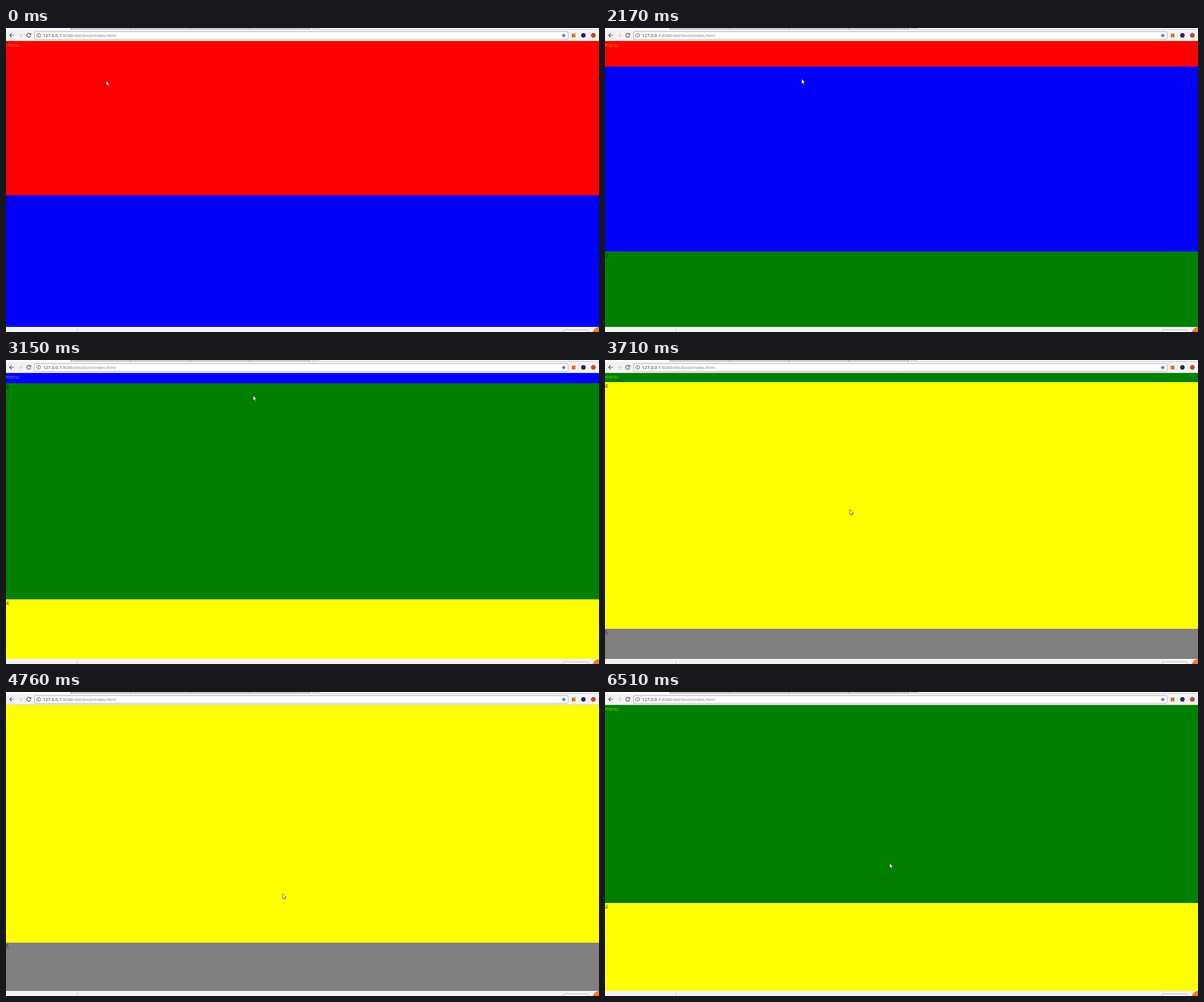
These frames come from a looping animation (1045x536 px, 6720 ms). An HTML page with a canvas:

```html
<!DOCTYPE html>
<html lang="en">
<head>
<meta charset="utf-8">
<title>Scrolling sections</title>
<style>
  html, body { margin: 0; width: 100%; height: 100%; overflow: hidden; background: #f2f2f2; }
  canvas { display: block; }
</style>
</head>
<body>
<canvas id="stage" width="1045" height="536"></canvas>
<script>
const ctx = document.getElementById('stage').getContext('2d');
const LOOP = 6720, STEP = 70;
const WIDTH = 1045, TOP = 23, BOTTOM = 527, SCALE = 0.544;
const FONT = '"Open Sans", "Noto Sans", sans-serif';
const COLORS = ['#f00', '#00f', '#008000', '#ff0', '#808080'];

// Rows of [time, value, ...]
const SCROLL = [
  [1190, 0], [1260, 20], [1400, 162], [1470, 162], [2170, 227], [2240, 320], [2380, 320],
  [2800, 335], [2870, 380], [3010, 518], [3080, 560], [3150, 580], [3290, 650], [3500, 755],
  [3570, 800], [3710, 963], [3780, 1078], [3920, 1078], [3990, 1200], [4060, 1284],
  [4200, 1284], [4760, 995]
];
const POINTER = [
  [70, 176, 92], [420, 215, 132], [770, 260, 187], [1190, 308, 253], [1260, 308, 292],
  [1400, 339, 130], [1470, 339, 130], [2170, 346, 89], [2240, 349, 68], [2380, 349, 68],
  [2800, 405, 322], [3010, 429, 124], [3080, 433, 82], [3150, 435, 62], [3500, 424, 425],
  [3570, 426, 390], [3710, 431, 263], [3780, 437, 190], [3920, 437, 190], [4060, 460, 66],
  [4200, 460, 66], [4760, 487, 355], [4970, 497, 418], [5670, 497, 418], [6300, 501, 304],
  [6370, 501, 301]
];

function sample(keys, t, column = 1) {
  const i = keys.findIndex(key => key[0] > t);
  if (i === 0) return keys[0][column];
  if (i < 0) return keys[keys.length - 1][column];
  const a = keys[i - 1], b = keys[i];
  return a[column] + (b[column] - a[column]) * (t - a[0]) / (b[0] - a[0]);
}

function scrollAt(t) {
  if (t < 4760) return sample(SCROLL, t);
  const rest = Math.max(0, 1 - (t - 4760) / 1540);
  return 630 + 365 * rest ** 2.6;
}

function rect(x, y, w, h, color) {
  ctx.fillStyle = color;
  ctx.fillRect(x, y, w, h);
}

function disc(x, y, r, color) {
  ctx.fillStyle = color;
  ctx.beginPath();
  ctx.arc(x, y, r, 0, 7);
  ctx.fill();
}

function box(x, y, w, h) {
  ctx.beginPath();
  ctx.roundRect(x, y, w, h, 1.5);
  ctx.fillStyle = '#fff';
  ctx.fill();
  ctx.strokeStyle = '#b4b4b4';
  ctx.lineWidth = 1;
  ctx.stroke();
}

function text(value, x, y, size, color) {
  ctx.font = `${size}px ${FONT}`;
  ctx.fillStyle = color;
  ctx.fillText(value, x, y);
  return ctx.measureText(value).width;
}

function line(path, color, width = 1.1) {
  ctx.strokeStyle = color;
  ctx.lineWidth = width;
  ctx.stroke(new Path2D(path));
}

function drawSections(scroll) {
  ctx.save();
  ctx.beginPath();
  ctx.rect(0, TOP, WIDTH, BOTTOM - TOP);
  ctx.clip();
  let offset = 0;
  COLORS.forEach((color, i) => {
    const height = (500 + 100 * i) * SCALE;
    const y = Math.round(TOP + offset - scroll);
    rect(0, y, WIDTH, Math.ceil(height) + 1, color);
    text(i + 1, 0, y + 9.6, 8.7, 'rgba(0,0,0,.75)');
    offset += height;
  });
  text('menu', 0, TOP + 9.6, 8.7, 'rgba(255,255,0,.55)');
  ctx.restore();
}

function drawToolbar() {
  rect(0, 0, WIDTH, TOP, '#f2f2f2');
  rect(0, 0, WIDTH, 3, '#fdfdfd');
  rect(114, 0, 421, 2.5, '#cfcfcf');
  rect(114, 2, WIDTH, 0.8, '#bcbcbc');
  for (let x = 114; x < 540; x += 105) rect(x, 0, 1, 3, '#999');
  rect(538, 0, 14, 1, '#bbb');
  rect(0, 22, WIDTH, 1, '#d0d0d0');

  line('M14 13H6.5M10 9.4L6.4 13L10 16.6', '#505050', 1.2);
  line('M21 13H28.5M25 9.4L28.6 13L25 16.6', '#cfcfcf', 1.2);
  line('M43 10.7A3.5 3.5 0 1 0 43.4 14.3M43.7 9.2V12H40.9', '#505050', 1.2);

  box(50.5, 6.5, 940, 13.5);
  line('M61 13A3.4 3.4 0 1 1 54.2 13A3.4 3.4 0 1 1 61 13M57.6 12.4V15M57.6 10.7V11.6', '#555', 0.9);
  const hostWidth = text('127.0.0.1', 65, 15.9, 7.83, '#222');
  text(':8088/dst/boot/index.html', 65 + hostWidth, 15.9, 7.83, '#777');

  ctx.fillStyle = '#4d78cc';
  ctx.beginPath();
  for (let i = 0; i < 10; i++) {
    const angle = i * Math.PI / 5, r = i % 2 ? 1.9 : 4.5;
    ctx.lineTo(983 + r * Math.sin(angle), 13.3 - r * Math.cos(angle));
  }
  ctx.fill();

  rect(997, 10, 6.5, 6.5, '#e07018');
  disc(1017.5, 13, 4, '#252b4d');
  disc(1035, 13, 4.3, '#c84b22');
}

function drawShelf() {
  rect(0, BOTTOM, WIDTH, 9, '#f2f2f2');
  rect(125, 530, 1, 6, '#c8c8c8');
  box(982.5, 532.5, 43, 8);
  disc(1046, 539, 12, '#f47b13');
}

function drawPointer(x, y) {
  ctx.save();
  ctx.translate(x + 0.4, y + 0.6);
  const arrow = new Path2D('M0 0V9L2.1 7.1L3.6 10.4L5 9.8L3.6 6.6H6.4Z');
  ctx.fillStyle = '#fff';
  ctx.fill(arrow);
  ctx.strokeStyle = 'rgba(0,0,0,.8)';
  ctx.lineWidth = 0.7;
  ctx.stroke(arrow);
  ctx.restore();
}

function draw(now) {
  const t = Math.floor(now % LOOP / STEP) * STEP;
  drawSections(scrollAt(t));
  drawToolbar();
  drawShelf();
  drawPointer(Math.round(sample(POINTER, t, 1)), Math.round(sample(POINTER, t, 2)));
}

const start = performance.now();
function tick() {
  draw(performance.now() - start);
  requestAnimationFrame(tick);
}
tick();
</script>
</body>
</html>
```
